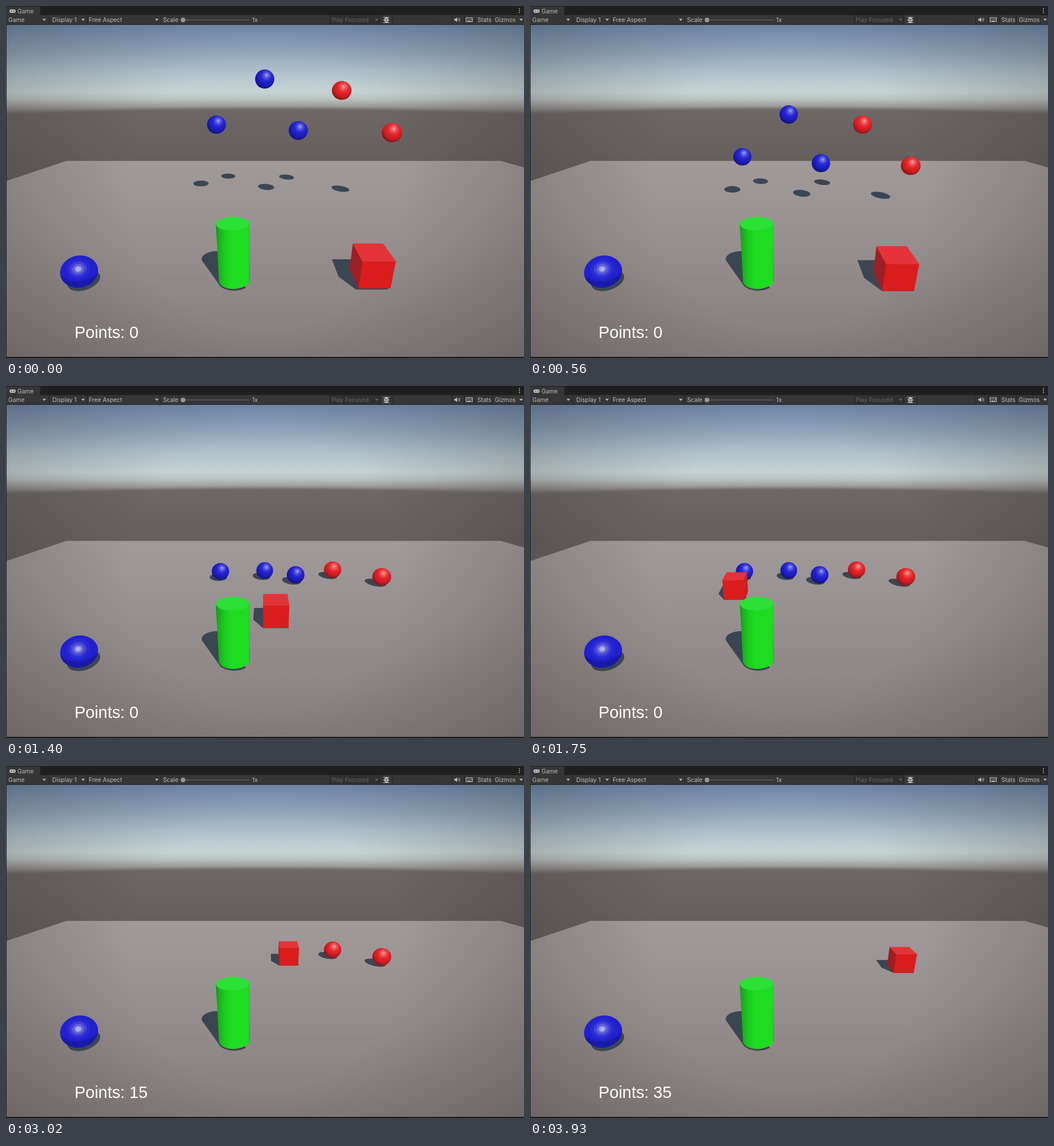
Recreate the animation shown at these times as an HTML page with a canvas. Size 907 px wide and 617 px high, loop 4.39 s.

```html
<!DOCTYPE html>
<html lang="en">
<head>
<meta charset="utf-8">
<title>Game view</title>
<style>
html, body { margin: 0; width: 100%; height: 100%; overflow: hidden; background: #1b1b1b; }
canvas { display: block; }
</style>
</head>
<body>
<canvas id="stage" width="907" height="617"></canvas>
<script>
const ctx = document.getElementById('stage').getContext('2d');
const LOOP = 4390, STEP = 70, LAST = 3930;
const SHADOW = '#3b4652';

// Camera: focal length, pitch and height, in units of one cube edge.
const FOCAL = 505, SIN = 0.362, COS = 0.932, HEIGHT = 6.17, RADIUS = 0.46;
const LIGHT = { x: -0.404, z: 0.64 };

const BLUE = ['#a3a3ee', '#5656df', '#2525d6', '#1a1ab4', '#11116c'];
const RED = ['#f0a09c', '#ee5a5a', '#e8262b', '#c51c22', '#7c1519'];
const balls = [
  { x: -2.42, y: 4.06, z: 14.7, colors: BLUE, taken: 1890, points: 5 },
  { x: 0, y: 6.19, z: 14.84, colors: BLUE, taken: 2470, points: 5 },
  { x: 1.64, y: 3.85, z: 14.2, colors: BLUE, taken: 2870, points: 5 },
  { x: 3.77, y: 5.67, z: 14.96, colors: RED, taken: 3330, points: 10 },
  { x: 6.11, y: 3.79, z: 13.93, colors: RED, taken: 3810, points: 10 }
];
// Cube route: time, x, z
const route = [
  [0, 3.42, 7.78], [1050, 3.42, 7.78], [1750, -2.55, 12.7], [2050, -2.45, 14.85],
  [2380, -1.39, 15.03], [3020, 1.3, 14.32], [LAST, 5.75, 13.44]
];

function project(x, y, z) {
  const down = HEIGHT - y, depth = z * COS + down * SIN;
  return [453 + FOCAL * x / depth, 325 + FOCAL * (down * COS - z * SIN) / depth, FOCAL / depth];
}
const cast = ([x, y, z]) => project(x + LIGHT.x * y, 0, z + LIGHT.z * y);
const fallen = t => 0.36 * t + 4.62 * t * t;

function poly(points, color) {
  ctx.beginPath();
  points.forEach(p => ctx.lineTo(p[0], p[1]));
  ctx.closePath();
  ctx.fillStyle = color;
  ctx.fill();
}
function oval(x, y, rx, ry, color, turn = 0) {
  ctx.beginPath();
  ctx.ellipse(x, y, rx, ry, turn, 0, 7);
  ctx.fillStyle = color;
  ctx.fill();
}
function rect(x, y, w, h, color) {
  ctx.fillStyle = color;
  ctx.fillRect(x, y, w, h);
}
function text(str, x, y, font, color) {
  ctx.font = font;
  ctx.fillStyle = color;
  ctx.fillText(str, x, y);
}
function addStops(gradient, stops) {
  stops.forEach(([at, color]) => gradient.addColorStop(at, color));
  return gradient;
}
const vertical = (y0, y1, stops) => addStops(ctx.createLinearGradient(0, y0, 0, y1), stops);

function drawScenery() {
  rect(0, 32, 907, 585, vertical(33, 190, [
    [0, '#7089aa'], [0.3, '#8fa6bb'], [0.55, '#b3c4cc'], [0.75, '#c6d3d3'],
    [0.83, '#b9c2c1'], [0.92, '#979695'], [1, '#6f6b69']
  ]));
  ctx.save();
  ctx.beginPath();
  ctx.rect(0, 32, 907, 585);
  ctx.clip();
  ctx.filter = 'blur(2px)';
  ctx.beginPath();
  ctx.moveTo(-20, 189);
  ctx.quadraticCurveTo(453, 169, 927, 189);
  ctx.lineTo(927, 320);
  ctx.lineTo(-20, 320);
  ctx.fillStyle = vertical(180, 272, [[0, '#6d6866'], [1, '#65605d']]);
  ctx.fill();
  ctx.restore();
  poly([[0, 307], [106, 271.5], [866, 271.5], [907, 283], [907, 617], [0, 617]],
    vertical(271, 617, [[0, '#a09a99'], [0.4, '#979090'], [1, '#857d7b']]));
  rect(0, 32, 907, 585, addStops(ctx.createRadialGradient(453, 325, 240, 453, 325, 560),
    [[0, 'rgba(30,24,22,0)'], [1, 'rgba(30,24,22,.24)']]));
}

function drawBallShadow(b, y) {
  const n = Math.hypot(LIGHT.x, LIGHT.z), ux = LIGHT.x / n, uz = LIGHT.z / n;
  const long = RADIUS * Math.hypot(1, n), points = [];
  for (let a = 0; a < 6.28; a += 0.2) {
    const p = Math.cos(a) * long, q = Math.sin(a) * RADIUS;
    points.push(project(b.x + LIGHT.x * y + ux * p + uz * q, 0, b.z + LIGHT.z * y + uz * p - ux * q));
  }
  poly(points, SHADOW);
}

function drawBall(b, y) {
  const [x, sy, scale] = project(b.x, y, b.z), r = RADIUS * scale;
  const g = ctx.createRadialGradient(x + 0.2 * r, sy - 0.42 * r, 0, x + 0.17 * r, sy - 0.3 * r, 1.36 * r);
  const stops = [0, 0.2, 0.42, 0.75, 1];
  const stretch = Math.abs(b.x) * 0.012;
  oval(x, sy, r * (1 + stretch), r, addStops(g, stops.map((s, i) => [s, b.colors[i]])));
}

function cubeAt(ms) {
  const i = Math.max(1, route.findIndex(k => k[0] >= ms));
  const [t0, x0, z0] = route[i - 1], [t1, x1, z1] = route[i];
  const k = (ms - t0) / (t1 - t0);
  return { x: x0 + (x1 - x0) * k, z: z0 + (z1 - z0) * k, y: Math.max(0, 0.1 - fallen(ms / 1000)) };
}

function cubeFaces({ x, y, z }) {
  const [l, r, b, t, f, k] = [x - 0.5, x + 0.5, y, y + 1, z - 0.5, z + 0.5];
  return {
    back: [[l, b, k], [r, b, k], [r, t, k], [l, t, k]],
    base: [[l, b, f], [r, b, f], [r, b, k], [l, b, k]],
    left: [[l, b, f], [l, b, k], [l, t, k], [l, t, f]],
    right: [[r, b, f], [r, b, k], [r, t, k], [r, t, f]],
    top: [[l, t, f], [r, t, f], [r, t, k], [l, t, k]],
    front: [[l, b, f], [r, b, f], [r, t, f], [l, t, f]]
  };
}

function drawCube(cube, faces) {
  const face = (name, color) => poly(faces[name].map(p => project(...p)), color);
  if (cube.x > 0.5) face('left', '#9c1f25');
  if (cube.x < -0.5) face('right', '#cb2026');
  face('top', '#e53238');
  face('front', '#db1c1d');
}

function drawDisc() {
  oval(136, 481, 30, 17, SHADOW, -0.32);
  ctx.save();
  ctx.beginPath();
  ctx.ellipse(128, 465.5, 33.5, 28, -0.2, 0, 7);
  ctx.clip();
  rect(90, 430, 80, 70, '#2020cf');
  ctx.beginPath();
  ctx.moveTo(90, 468);
  ctx.quadraticCurveTo(125, 500, 166, 464);
  ctx.lineTo(166, 505);
  ctx.lineTo(90, 505);
  ctx.fillStyle = '#1919a6';
  ctx.fill();
  [[21, '#2929d2'], [15, '#4040d5'], [10.5, '#6060da'], [6, '#9a9ae0'], [3.5, '#b3b3e2']]
    .forEach(([r, color]) => oval(126.5, 461, r, r * 0.86, color, -0.2));
  ctx.restore();
}

function drawCylinder() {
  ctx.beginPath();
  ctx.moveTo(343, 446);
  ctx.bezierCurveTo(340, 436, 356, 428, 376, 430);
  ctx.lineTo(420, 494);
  ctx.bezierCurveTo(408, 501, 386, 501, 375, 491);
  ctx.closePath();
  ctx.fillStyle = SHADOW;
  ctx.fill();
  const g = ctx.createLinearGradient(367, 0, 428, 0);
  ctx.beginPath();
  ctx.moveTo(367.5, 382);
  ctx.lineTo(373, 484);
  ctx.bezierCurveTo(379, 500, 417, 500, 427, 483);
  ctx.lineTo(426, 381);
  ctx.closePath();
  ctx.fillStyle = addStops(g, [[0, '#127d18'], [0.06, '#17a91c'], [0.25, '#1cca20'],
    [0.45, '#1edc20'], [0.95, '#1edc20'], [1, '#159319']]);
  ctx.fill();
  oval(396.7, 381.5, 29.3, 12, '#2ce036', -0.02);
}

function drawToolbar() {
  const ui = '10.3px Inter, sans-serif', ink = '#bdbdbd';
  const arrow = (x, color = ink) => poly([[x - 3.2, 22.5], [x + 3.2, 22.5], [x, 26]], color);
  rect(0, 0, 907, 33, '#1f1f1f');
  rect(0, 1, 60, 16, '#363636');
  rect(0, 16, 907, 16, '#363636');
  rect(567, 16, 87, 16, '#303030');
  [75, 142, 270, 567, 654, 677, 780, 802, 821, 851].forEach(x => rect(x, 16, 1, 16, '#242424'));
  text('Game', 20, 12.5, ui, ink);
  [['Game', 4], ['Display 1', 81], ['Free Aspect', 145], ['Scale', 275], ['1x', 431],
    ['Stats', 825.5], ['Gizmos', 856]].forEach(([s, x]) => text(s, x, 28, ui, ink));
  text('Play Focused', 570, 28, ui, '#666');
  [67, 135, 264, 902].forEach(x => arrow(x));
  arrow(649, '#666');
  rect(310, 24, 116, 1, '#5f6b73');
  oval(310, 24.5, 4, 4, '#999');
  [4.5, 8, 11.5].forEach(y => oval(899, y, 1, 1, ink));

  // Gamepad
  ctx.beginPath();
  ctx.roundRect(6, 6, 11, 6, 3);
  ctx.fillStyle = ink;
  ctx.fill();
  rect(8, 8.5, 3, 1, '#363636');
  oval(14, 9, 1, 1, '#363636');

  // Bug
  ctx.strokeStyle = ink;
  ctx.lineWidth = 1;
  ctx.beginPath();
  for (const y of [20, 24.5, 29]) {
    ctx.moveTo(660.5, y);
    ctx.lineTo(671.5, y);
  }
  ctx.stroke();
  oval(666, 24.5, 3.6, 5.2, ink);
  rect(664, 23, 4, 1, '#363636');
  rect(664, 26, 4, 1, '#363636');

  // Speaker
  poly([[785, 22.5], [787, 22.5], [790, 20], [790, 28], [787, 25.5], [785, 25.5]], ink);
  for (const r of [2.5, 4.5]) {
    ctx.beginPath();
    ctx.arc(790, 24, r, -0.9, 0.9);
    ctx.stroke();
  }

  // Keyboard
  ctx.strokeRect(805.5, 20.5, 11, 7);
  for (let x = 807; x < 816; x += 2) {
    rect(x, 22, 1, 1, ink);
    rect(x, 24, 1, 1, ink);
  }
  rect(808, 26, 6, 1, ink);
}

function render(ms) {
  const t = ms / 1000, cube = cubeAt(ms), faces = cubeFaces(cube);
  const live = balls.filter(b => ms < b.taken);
  const heightOf = b => Math.max(RADIUS, b.y - fallen(t));
  const score = balls.reduce((sum, b) => sum + (ms < b.taken ? 0 : b.points), 0);

  drawScenery();
  live.forEach(b => drawBallShadow(b, heightOf(b)));
  Object.values(faces).forEach(f => poly(f.map(cast), SHADOW));
  const items = live.map(b => ({ z: b.z, draw: () => drawBall(b, heightOf(b)) }));
  items.push({ z: cube.z, draw: () => drawCube(cube, faces) });
  items.sort((a, b) => b.z - a.z).forEach(i => i.draw());
  drawDisc();
  drawCylinder();
  text('Points: ' + score, 120, 582, '28.8px "Liberation Sans", Arial, sans-serif', '#fff');
  drawToolbar();
  rect(0, 33, 1, 584, '#1b1b1b');
  rect(0, 615, 907, 2, '#1b1b1b');
}

const start = performance.now();
function tick() {
  const ms = (performance.now() - start) % LOOP;
  render(Math.min(LAST, Math.floor(ms / STEP) * STEP));
  requestAnimationFrame(tick);
}
tick();
</script>
</body>
</html>
```
